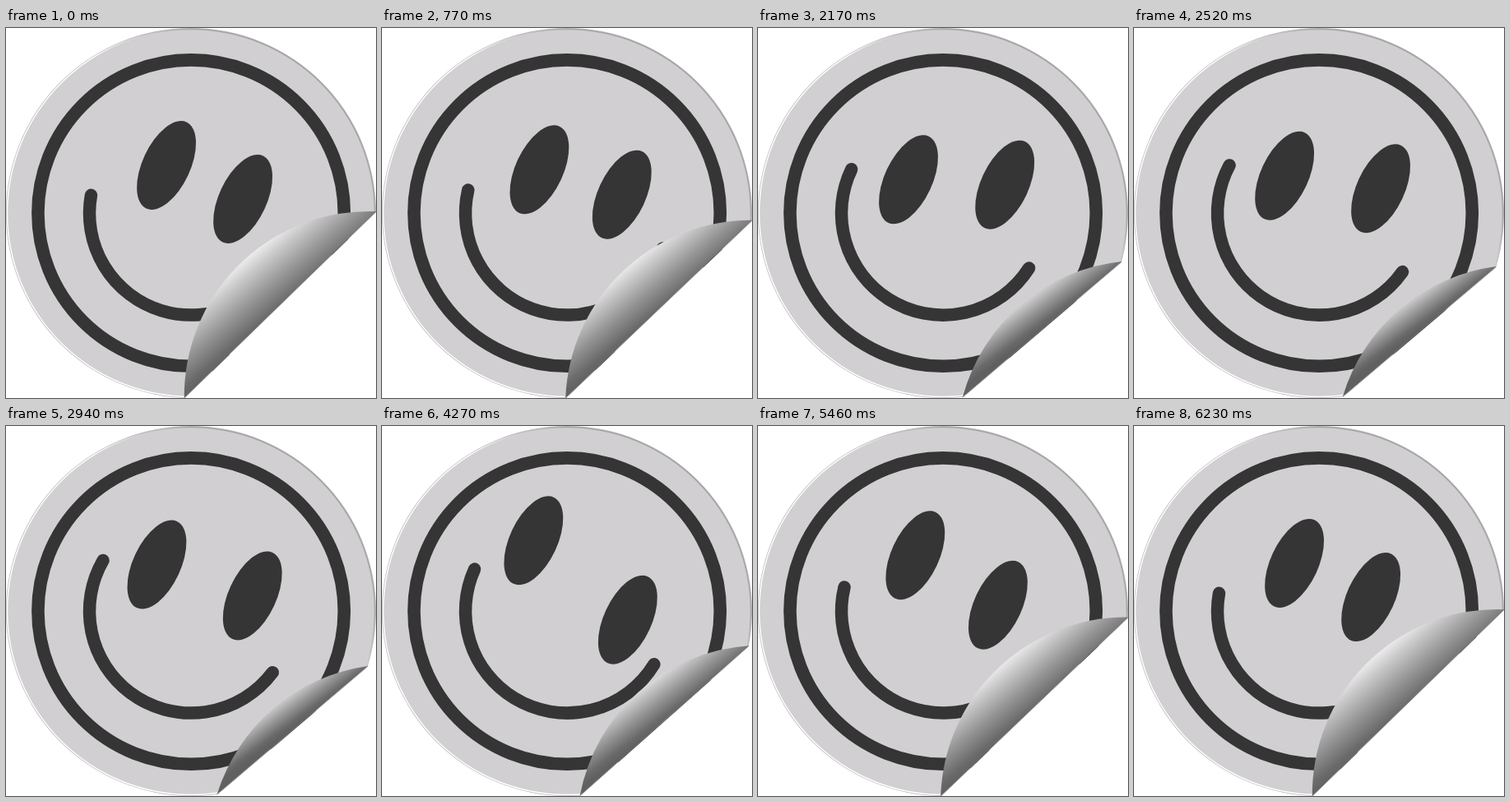
An HTML page with a canvas that plays this animation: 450 by 450 pixels, repeating every 6.3 s.

```html
<!DOCTYPE html>
<html lang="en">
<head>
<meta charset="utf-8">
<title>Peeling smiley sticker</title>
<style>
  html, body { margin: 0; width: 100%; height: 100%; overflow: hidden; background: #fff; }
  canvas { display: block; width: 450px; height: 450px; }
</style>
</head>
<body>
<canvas id="stage" width="450" height="450"></canvas>
<script>
const ctx = document.getElementById('stage').getContext('2d');
const LOOP = 6300, STEP = 70;
const C = 225, R = 225, INK = '#353535';

const rad = deg => deg * Math.PI / 180;
const mix = (a, b, k) => a + (b - a) * k;
const smooth = u => u * u * (3 - 2 * u);
const onRim = deg => [C + R * Math.cos(rad(deg)), C + R * Math.sin(rad(deg))];

// Half the vector between the eyes, eased from key to key.
const EYE_MID = [241.6, 187.5];
const EYE_KEYS = [[46.5, 20.5], [58.6, 3], [57.3, 48.3]];

// Rim angles of the two ends of the fold, in degrees.
const PEEL_TIMES = [0, 1400, 2170, 2940, 4270, 4830, LOOP];
const PEEL_RIGHT = [-0.5, 6.7, 15.2, 17.3, 10.8, 5.4, -0.5];
const PEEL_BOTTOM = [92.1, 88, 83.9, 81.9, 86, 88.8, 92.1];

function slope(values, i) {
  const a = values[i - 1], b = values[i], c = values[i + 1];
  if (a === undefined || c === undefined || (b - a) * (c - b) <= 0) return 0;
  return (c - a) / (PEEL_TIMES[i + 1] - PEEL_TIMES[i - 1]);
}

// Cubic Hermite curve, flat at turning points.
function track(values, t) {
  let i = 0;
  while (t >= PEEL_TIMES[i + 1]) i++;
  const span = PEEL_TIMES[i + 1] - PEEL_TIMES[i];
  const u = (t - PEEL_TIMES[i]) / span, v = 1 - u;
  return mix(values[i], values[i + 1], smooth(u))
    + span * u * v * (v * slope(values, i) - u * slope(values, i + 1));
}

function gradient(x0, y0, x1, y1, stops) {
  const paint = ctx.createLinearGradient(x0, y0, x1, y1);
  for (const [at, color] of stops) paint.addColorStop(at, color);
  return paint;
}

function disc(radius, fill) {
  ctx.beginPath();
  ctx.arc(C, C, radius, 0, 2 * Math.PI);
  ctx.fillStyle = fill;
  ctx.fill();
}

function arc(center, radius, from, to, width) {
  ctx.beginPath();
  ctx.arc(center, center, radius, rad(from), rad(to));
  ctx.lineWidth = width;
  ctx.strokeStyle = INK;
  ctx.stroke();
}

function eye(x, y) {
  ctx.beginPath();
  ctx.ellipse(x, y, 29, 58, rad(25), 0, 2 * Math.PI);
  ctx.fillStyle = INK;
  ctx.fill();
}

function drawEyes(t) {
  const leg = t / LOOP * 3, i = Math.floor(leg), k = smooth(leg - i);
  const [a, b] = [EYE_KEYS[i], EYE_KEYS[(i + 1) % 3]];
  const dx = mix(a[0], b[0], k), dy = mix(a[1], b[1], k);
  eye(EYE_MID[0] - dx, EYE_MID[1] - dy);
  eye(EYE_MID[0] + dx, EYE_MID[1] + dy);
}

function drawFace(t) {
  disc(R, '#b4b4b4');
  disc(R - 0.7, gradient(66, 384, 384, 66, [[0, '#fff'], [0.6, '#fff'], [0.85, '#aaa'], [1, '#a4a4a4']]));
  disc(R - 2.2, '#d1cfd2');
  ctx.lineCap = 'round';
  arc(225.1, 186.2, 0, 360, 15.6);
  const swing = 10.2 + 20 * smooth(1 - Math.abs(1 - 2 * t / LOOP));
  arc(225.3, 123.8, swing + 7, 180 + swing, 15.5);
  drawEyes(t);
}

function drawFlap(right, bottom) {
  // The flap is the missing part of the disc mirrored in the fold.
  const cx = right[0] + bottom[0] - C, cy = right[1] + bottom[1] - C;
  const depth = R - Math.hypot(cx - C, cy - C) / 2;
  const normal = Math.atan2(cy - C, cx - C), lean = normal + 0.07;
  // A flatter flap catches less light, so its shading starts further back.
  const back = R + (72 - depth) * 0.25, reach = depth * 1.2;
  const x = cx - back * Math.cos(normal), y = cy - back * Math.sin(normal);

  ctx.beginPath();
  ctx.arc(cx, cy, R, Math.atan2(right[1] - cy, right[0] - cx),
    Math.atan2(bottom[1] - cy, bottom[0] - cx), true);
  ctx.closePath();
  ctx.fillStyle = gradient(x, y, x + reach * Math.cos(lean), y + reach * Math.sin(lean), [
    [0, '#ececec'], [0.2, '#cacaca'], [0.55, '#949494'], [0.85, '#6a6a6a'], [1, '#606060']
  ]);
  ctx.fill();

  ctx.beginPath();
  ctx.moveTo(...right);
  ctx.lineTo(...bottom);
  ctx.lineWidth = 1;
  ctx.lineCap = 'butt';
  ctx.strokeStyle = '#777';
  ctx.stroke();
}

function draw(t) {
  const right = onRim(track(PEEL_RIGHT, t));
  const bottom = onRim(track(PEEL_BOTTOM, t));
  ctx.fillStyle = '#fff';
  ctx.fillRect(0, 0, 450, 450);

  ctx.save();
  ctx.beginPath();
  ctx.arc(C, C, R + 1, Math.atan2(bottom[1] - C, bottom[0] - C),
    Math.atan2(right[1] - C, right[0] - C));
  ctx.closePath();
  ctx.clip();
  drawFace(t);
  ctx.restore();

  drawFlap(right, bottom);
}

const start = performance.now();
function tick() {
  const t = Math.max(0, performance.now() - start) % LOOP;
  draw(Math.floor(t / STEP) * STEP);
  requestAnimationFrame(tick);
}
tick();
</script>
</body>
</html>
```
